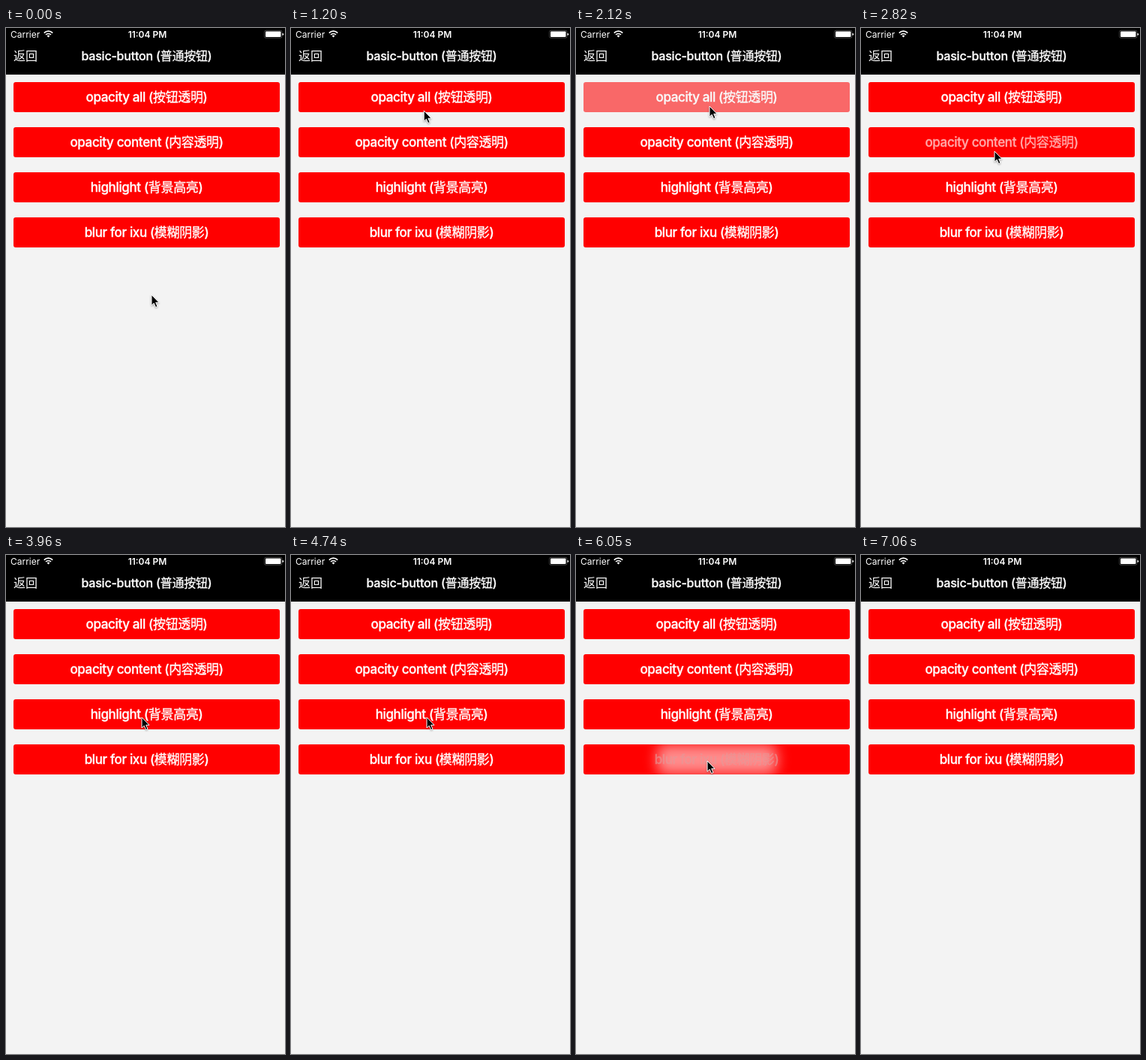
These frames come from a looping animation (372x664 px, 7.4 s). An HTML page:

```html
<!DOCTYPE html>
<html lang="zh-CN">
<head>
<meta charset="utf-8">
<title>Buttons</title>
<style>
  html, body { margin: 0; width: 100%; height: 100%; overflow: hidden; background: #f3f3f3; }
  body, text { font-family: Inter, "Noto Sans CJK SC", "Noto Sans CJK", sans-serif; }
  body { position: relative; color: #fff; }
  header, header svg { display: block; width: 372px; height: 62px; background: #000; }
  header svg { fill: #fff; }
  .bold { stroke: #fff; stroke-width: .3px; }
  .button {
    position: relative; width: 355px; height: 40px; margin: 10px 10px 20px; overflow: hidden;
    border-radius: 3px; background: red; text-align: center;
    font: 500 17px/40px Inter, "Noto Sans CJK SC", "Noto Sans CJK", sans-serif;
    letter-spacing: -.36px; -webkit-text-stroke: .35px currentColor;
  }
  .button + .button { margin-top: 0; }
  .button span { position: relative; }
  #glow {
    position: absolute; left: 98px; top: 0; width: 160px; height: 40px; border-radius: 10px;
    background: #fff; filter: blur(9px);
  }
  #cursor { position: absolute; left: 0; top: 0; overflow: visible; }
</style>
</head>
<body>
<header>
  <svg viewBox="0 0 372 62">
    <text x="6" y="12.5" font-size="12">Carrier</text>
    <path d="M50.8 6.6a8 8 0 0 1 11.4 0M53 9a5 5 0 0 1 7 0" fill="none" stroke="#fff" stroke-width="1.7"/>
    <path d="M56.5 12.4l-1.9-2a2.8 2.8 0 0 1 3.8 0z"/>
    <text x="188.5" y="12.5" font-size="12" font-weight="600" text-anchor="middle">11:04 PM</text>
    <rect x="344.5" y="3.25" width="23.5" height="10" rx="2" fill="none" stroke="#fff" stroke-width=".5" opacity=".5"/>
    <rect x="346" y="4.5" width="20.5" height="7.5" rx="1"/>
    <path d="M368.5 6.7a1.6 1.6 0 0 1 0 3.2z"/>
    <text x="10" y="42.5" font-size="16">返回</text>
    <text class="bold" x="187.5" y="42.5" font-size="16" font-weight="500" letter-spacing="-.2"
      text-anchor="middle">basic-button (普通按钮)</text>
  </svg>
</header>
<div class="button" id="fadeAll">opacity all (按钮透明)</div>
<div class="button"><span id="fadeText">opacity content (内容透明)</span></div>
<div class="button" id="highlight">highlight (背景高亮)</div>
<div class="button"><div id="glow"></div><span id="glowText">blur for ixu (模糊阴影)</span></div>
<svg id="cursor" width="12" height="19">
  <path d="M0 0V14.2L3.2 11.2L5.6 16.6L8 15.6L5.7 10.3H10Z" stroke="#fff"
    style="filter: drop-shadow(.5px 1px .8px #0005)"/>
</svg>
<script>
const LOOP = 7400, TICK = 60;
const [fadeAll, fadeText, highlight, glow, glowText, cursor] =
  ['fadeAll', 'fadeText', 'highlight', 'glow', 'glowText', 'cursor'].map(id => document.getElementById(id));

const home = { x: 194, y: 355 };
const moves = [
  { start: 600, end: 1320, x: 178, y: 104, bend: -16 },
  { start: 2300, end: 2580, x: 178, y: 164 },
  { start: 3600, end: 3960, x: 181, y: 216 },
  { start: 5040, end: 5460, x: 175, y: 274 },
  { start: 6290, end: 6580, x: 213, y: 541 },
  { start: 6760, end: 7060, x: 331, y: 667 }
];

const mix = (a, b, k) => a + (b - a) * k;
const easeOut = k => 1 - (1 - k) ** 2;
const easeInOut = k => k < .5 ? 2 * k * k : 1 - 2 * (1 - k) ** 2;

// Progress from 0 to 1, advancing once per tick
function progress(t, start, length) {
  const ticks = Math.floor((t - start) / TICK) + 1;
  return Math.max(0, Math.min(1, ticks * TICK / length));
}

// 0 at rest, 1 while held
const press = (t, down, up) =>
  easeInOut(progress(t, down, 130)) - easeInOut(progress(t, up, 250));

function cursorAt(t) {
  return moves.reduce((p, { start, end, x, y, bend = 0 }) => {
    const k = easeOut(progress(t, start, end - start + TICK));
    return { x: mix(p.x, x, k) + bend * Math.sin(Math.PI * k), y: mix(p.y, y, k) };
  }, home);
}

function draw(now) {
  const t = now % LOOP;
  fadeAll.style.opacity = 1 - .8 * press(t, 1580, 2060);
  fadeText.style.opacity = 1 - .8 * press(t, 2820, 3360);

  const lit = t >= 4260 && t < 4740;
  highlight.style.background = lit ? '#c00' : 'red';
  highlight.style.color = lit ? '#ccc' : '#fff';

  const k = press(t, 5640, 6050);
  glow.style.opacity = .62 * k;
  glowText.style.color = `rgb(${mix(255, 225, k)}, ${mix(255, 140, k)}, ${mix(255, 140, k)})`;
  glowText.style.opacity = 1 - .4 * k;

  const { x, y } = cursorAt(t);
  cursor.style.transform = `translate(${x}px, ${y}px)`;
  requestAnimationFrame(draw);
}
draw(0);
</script>
</body>
</html>
```
